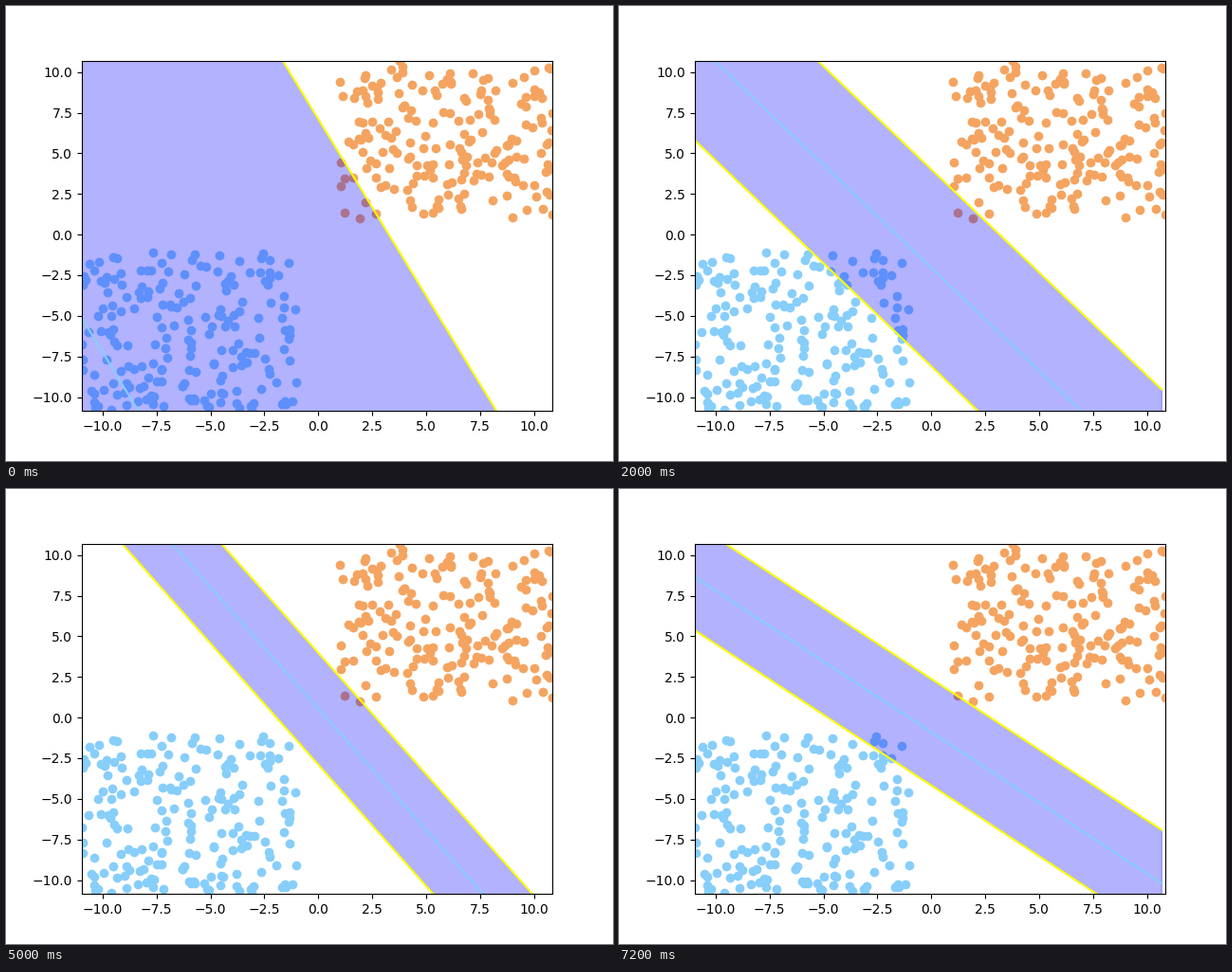
Write a matplotlib script that moves like this. It is 640 by 480 pixels and loops after 7600 ms.

```python
import numpy as np
import matplotlib.pyplot as plt
from matplotlib.animation import FuncAnimation

FRAMES, INTERVAL = 38, 200
X_LIM, Y_LIM = (-10.95, 10.83), (-10.856, 10.709)
LINE_X = np.array([X_LIM[0], 10.67])

# The nearest points of each cluster, which the margin picks out.
ORANGE_NEAR = [(1.04, 4.45), (1.04, 2.99), (1.2, 3.45), (1.2, 1.35),
               (1.92, 1.0), (1.6, 3.5), (2.18, 2.0), (2.67, 1.3)]
BLUE_NEAR = [(-1.38, -1.74), (-2.56, -1.16), (-2.65, -1.45), (-2.25, -1.56),
             (-1.85, -2.5), (-1.07, -4.6), (-1.38, -6.4), (-4.06, -2.56)]

# (frame, slope, centre line at x = 0, vertical half width of the margin)
KEYS = [(0, -2.178, -29.0, 36.1),
        (4, -0.60, -4.0, 5.0),
        (6, -0.883, -4.88, 3.29),
        (10, -1.270, -2.05, 6.06),
        (17, -1.448, 2.67, 4.16),
        (22, -1.586, 1.01, 4.10),
        (29, -1.414, 0.10, 2.83),
        (36, -0.872, -0.90, 3.28)]
IDLE = (5, 7, 11, 13, 18, 37)  # steps whose sample leaves the line unchanged


def cloud(rng, low, high, near, slope, limit, count=192):
    """Uniform square whose inner corner, x * slope + y > limit, is set by hand."""
    xy = rng.uniform(low, high, (count, 2))
    return np.vstack([near, xy[xy @ (slope, 1) < limit]])


def training_step(frame):
    return frame - np.searchsorted(IDLE, frame, side="right")


def boundary(frame):
    """Slope, centre and half width, interpolated as classifier weights."""
    frames, slope, centre, half = np.transpose(KEYS)
    weights = (-centre / half, -slope / half, 1 / half)
    w0, w1, w2 = (np.interp(training_step(frame), training_step(frames), w)
                  for w in weights)
    return -w1 / w2, -w0 / w2, 1 / w2


rng = np.random.default_rng(3)
orange = -cloud(rng, -X_LIM[1], -1, np.negative(ORANGE_NEAR), 1.5, -7)
blue = cloud(rng, X_LIM[0], -1, BLUE_NEAR, 0.87, -4.2)

fig, ax = plt.subplots(figsize=(6.4, 4.8), dpi=100)
ax.scatter(*orange.T, color="sandybrown")
ax.scatter(*blue.T, color="lightskyblue")
band, = ax.fill([0, 1, 1], [0, 0, 1], color="blue", alpha=0.3, lw=1)
middle, = ax.plot([], [], color="lightskyblue")
upper, = ax.plot([], [], color="yellow")
lower, = ax.plot([], [], color="yellow")
ax.set(xlim=X_LIM, ylim=Y_LIM)


def update(frame):
    slope, centre, half = boundary(frame)
    y = slope * LINE_X + centre
    for line, offset in ((middle, 0), (upper, half), (lower, -half)):
        line.set_data(LINE_X, y + offset)
    band.set_xy(np.column_stack([np.r_[LINE_X, LINE_X[::-1]],
                                 np.r_[y + half, (y - half)[::-1]]]))
    return band, middle, upper, lower


anim = FuncAnimation(fig, update, frames=FRAMES, interval=INTERVAL,
                     repeat=True, repeat_delay=0)
plt.show()
```
